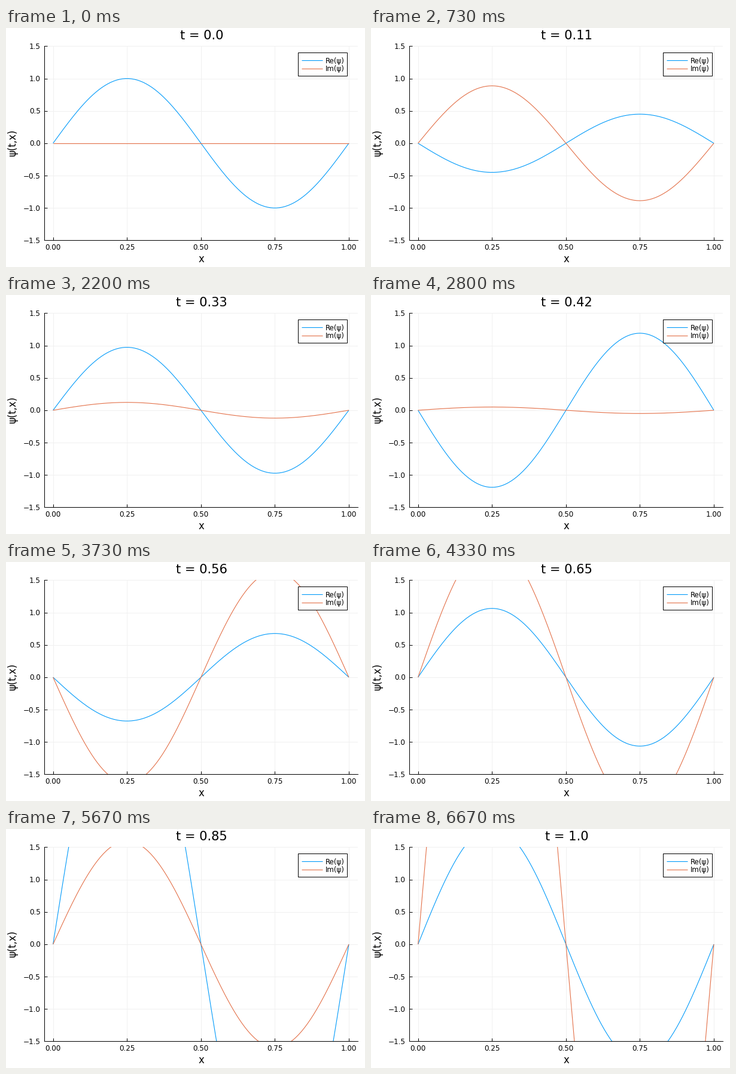
A matplotlib script that plays this animation: 600x400 px, repeating every 6.74 s.

```python
import numpy as np
import matplotlib.pyplot as plt
from matplotlib.animation import FuncAnimation
from matplotlib.patches import Rectangle

W, H, DPI = 600, 400, 100
PX = 72 / DPI  # points per pixel
LOOP_MS, TICK_MS = 6740, 20
STEPS, FPS = 100, 15
LEFT, RIGHT, TOP, BOTTOM = 63.8, 587.8, 30.4, 355.4
BLUE, ORANGE = "#009AFA", "#E36F47"

plt.rcParams["font.family"] = "DejaVu Sans"

# Wave amplitude (as a logarithm) and phase, each with its rate of change.
TIMES = np.array([0, 0.23, 0.33, 0.42, 0.56, 0.74, 0.85, 1])
LOG_AMP = np.array([0, -0.029, -0.02, 0.175, 0.5695, 1.165, 1.585, 2.153])
GROWTH = np.array([0, -0.3, 1.2, 2.6, 3.0, 3.65, 3.82, 3.75])
PHASE = np.array([0, 8.746, 12.442, 15.75, 20.813, 27.225, 31.083, 36.34])
SPEED = np.array([39.2, 37.1, 36.9, 36.5, 35.85, 35.25, 35.05, 35.0])


def hermite(t, values, slopes):
    """Smooth curve through the values at TIMES with the given slopes."""
    i = min(np.searchsorted(TIMES, t, side="right") - 1, len(TIMES) - 2)
    h = TIMES[i + 1] - TIMES[i]
    s = (t - TIMES[i]) / h
    return ((1 + 2 * s) * (1 - s) ** 2 * values[i]
            + s * (1 - s) ** 2 * h * slopes[i]
            + s * s * (3 - 2 * s) * values[i + 1]
            + s * s * (s - 1) * h * slopes[i + 1])


def psi_amplitude(t):
    return np.exp(hermite(t, LOG_AMP, GROWTH) - 1j * hermite(t, PHASE, SPEED))


fig = plt.figure(figsize=(W / DPI, H / DPI), dpi=DPI, facecolor="white")


def label(x, y, text, size, **kw):
    """Text with its baseline at pixel (x, y), y counted from the top."""
    kw.setdefault("ha", "center")
    return fig.text(x / W, 1 - y / H, text, fontsize=size * PX,
                    va="baseline", color="black", **kw)


ax = fig.add_axes([LEFT / W, 1 - BOTTOM / H,
                   (RIGHT - LEFT) / W, (BOTTOM - TOP) / H])
ax.set_xlim(-0.03, 1.03)
ax.set_ylim(-1.5, 1.5)
ax.set_xticks(np.linspace(0, 1, 5))
ax.set_yticks(np.linspace(-1.5, 1.5, 7))
ax.tick_params(direction="in", length=5 * PX, width=PX,
               labelbottom=False, labelleft=False)
ax.grid(color="#f0f0f0", linewidth=PX)
ax.set_axisbelow(True)
for side in ("top", "right"):
    ax.spines[side].set_visible(False)
for side in ("left", "bottom"):
    ax.spines[side].set_linewidth(PX)

for v in ax.get_xticks():
    label(LEFT + (v + 0.03) / 1.06 * (RIGHT - LEFT), 371, f"{v:.2f}", 12)
for v in ax.get_yticks():
    y = TOP + (1.5 - v) / 3 * (BOTTOM - TOP)
    label(57.5, y + 4.5, f"{v:.1f}".replace("-", "\u2212"), 12, ha="right")

label(326, 392, "x", 16.5)
label(16.4, 192, "ψ(t,x)", 16.5, rotation=90, rotation_mode="anchor")
title = label(327, 19, "", 21)

x = np.linspace(0, 1, 201)
wave = np.sin(2 * np.pi * x)
style = dict(linewidth=1.1 * PX, solid_capstyle="butt")
re_line, = ax.plot(x, wave, color=BLUE, **style)
im_line, = ax.plot(x, 0 * wave, color=ORANGE, **style)

# Legend, laid out in pixels above the curves.
key = fig.add_axes([0, 0, 1, 1], zorder=5)
key.set_xlim(0, W)
key.set_ylim(H, 0)
key.axis("off")
key.add_patch(Rectangle((488, 41), 82, 39, facecolor="white",
                        edgecolor="black", linewidth=PX))
for y, name, color in ((54.2, "Re(ψ)", BLUE), (67.6, "Im(ψ)", ORANGE)):
    key.plot([493.6, 529.2], [y, y], color=color, **style)
    key.text(533.8, y + 4.7, name, fontsize=11.8 * PX, va="baseline")


def update(tick):
    # The picture steps at FPS, with step times rounded to the clock.
    ms = tick * TICK_MS + 15
    t = min(ms * FPS // 1000, STEPS) / STEPS
    amp = psi_amplitude(t)
    re_line.set_ydata(amp.real * wave)
    im_line.set_ydata(amp.imag * wave)
    title.set_text(f"t = {round(t, 2)}")
    return re_line, im_line, title


anim = FuncAnimation(fig, update, frames=LOOP_MS // TICK_MS, interval=TICK_MS,
                     init_func=lambda: update(0), repeat=True, repeat_delay=0)
plt.show()
```
